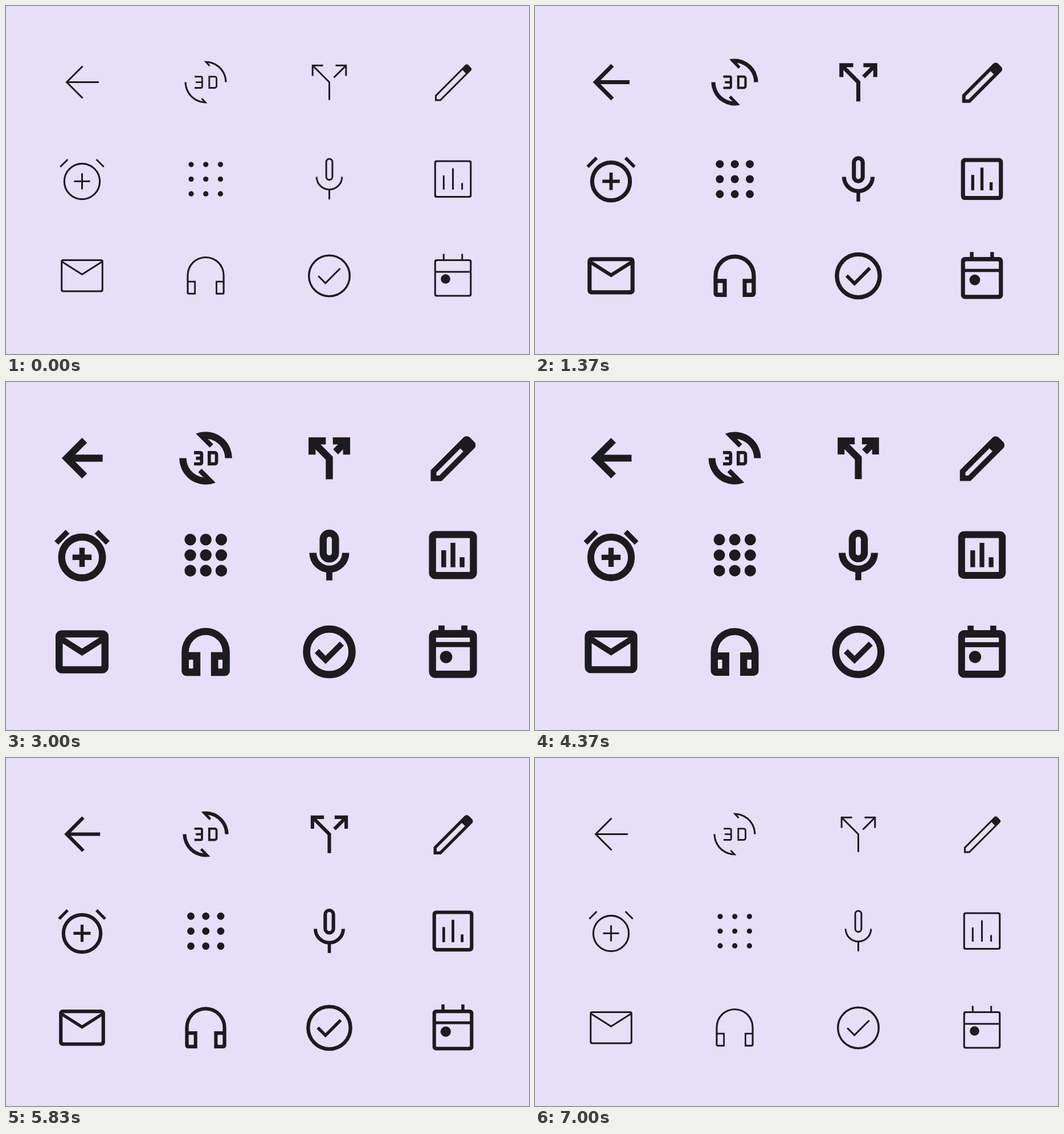
An HTML page with a canvas that plays this animation: 918x610 px, repeating every 8010 ms.

```html
<!DOCTYPE html>
<html lang="en">
<head>
<meta charset="utf-8">
<title>Icon weights</title>
<style>
  html, body { margin: 0; width: 100%; height: 100%; overflow: hidden; background: #e7def7; }
  canvas { display: block; }
</style>
</head>
<body>
<canvas id="stage" width="918" height="610"></canvas>
<script>
const ctx = document.getElementById('stage').getContext('2d');
const LOOP = 8010, RAMP = 3000, HOLD_END = 4000;
const COLUMNS = [133.5, 350.5, 567.5, 784.5];
const ROWS = [133.5, 303.5, 473];
const INK = '#1c1b1f', PAPER = '#e7def7';

let weight = 0; // 0 = thin, 1 = bold
const mix = (thin, bold) => thin + (bold - thin) * weight;

// Drawing helpers, all relative to the centre of an icon
function line(width, ...points) {
  ctx.lineWidth = width;
  ctx.beginPath();
  points.forEach(([x, y]) => ctx.lineTo(x, y));
  ctx.stroke();
}

function dot(x, y, r) {
  ctx.beginPath();
  ctx.arc(x, y, r, 0, 2 * Math.PI);
  ctx.fill();
}

function ring(x, y, outer, inner) {
  ctx.lineWidth = outer - inner;
  ctx.beginPath();
  ctx.arc(x, y, (outer + inner) / 2, 0, 2 * Math.PI);
  ctx.stroke();
}

// Rounded frame, centred horizontally
function frame(outerX, top, bottom, innerX, innerTop, innerBottom) {
  ctx.beginPath();
  ctx.roundRect(-outerX, top, 2 * outerX, bottom - top, mix(4, 10.5));
  ctx.roundRect(-innerX, innerTop, 2 * innerX, innerBottom - innerTop, mix(2, 1));
  ctx.fill('evenodd');
}

function mirrored(draw) {
  draw();
  ctx.save();
  ctx.scale(-1, 1);
  draw();
  ctx.restore();
}

function arrowBack() {
  const w = mix(3, 12.4), x = mix(1, 4.4), y = mix(28, 31.4);
  line(w, [x, -y], [-27, 0], [x, y]);
  line(w, [-27, 0], [mix(29.5, 36.2), 0]);
}

function rotateHalf() {
  const outer = mix(37, 46.3), inner = 33.9;
  ctx.beginPath();
  ctx.arc(0, 0, outer, Math.atan2(mix(-36.7, -42.9), mix(-3, -17.3)), 0);
  ctx.arc(0, 0, inner, 0, Math.atan2(-33.7, 4), true);
  ctx.lineTo(mix(8, 13.2), mix(-29.5, -24.4));
  ctx.lineTo(mix(6, 7.2), mix(-27.5, -18.4));
  ctx.fill();
}

function rotate3d() {
  rotateHalf();
  ctx.save();
  ctx.rotate(Math.PI);
  rotateHalf();
  ctx.restore();

  const left = mix(-19.5, -20.5), right = mix(-6.2, -7.2), top = -9.7, bottom = 10;
  ctx.lineWidth = mix(2.8, 5.7);
  ctx.beginPath();
  ctx.moveTo(left, top);
  ctx.arcTo(right, top, right, 0, 2);
  ctx.arcTo(right, bottom, left, bottom, 2);
  ctx.lineTo(left, bottom);
  ctx.moveTo(mix(-17.5, -17), .2);
  ctx.lineTo(right, .2);
  ctx.moveTo(6.3, top);
  ctx.arcTo(19, top, 19, 0, 3);
  ctx.arcTo(19, bottom, 6.3, bottom, 3);
  ctx.lineTo(6.3, bottom);
  ctx.closePath();
  ctx.stroke();
}

function callSplit() {
  const w = mix(3, 12.4), c = mix(29.3, 30.3), end = mix(11, 6.2), gap = mix(8, 11);
  mirrored(() => line(w, [-end, -c], [-c, -c], [-c, -end]));
  line(w, [-c, -c], [0, 0], [0, mix(31.3, 37)]);
  line(w, [c, -c], [gap, -gap]);
}

// Diagonal bar: s1 and s2 are x + y of its long sides, d is x - y of its far end
function pencilPath(left, bottom, s1, s2, d, radius) {
  ctx.moveTo(left, bottom);
  ctx.lineTo(left, s1 - left);
  ctx.arcTo((s1 + d) / 2, (s1 - d) / 2, (s2 + d) / 2, (s2 - d) / 2, radius);
  ctx.arcTo((s2 + d) / 2, (s2 - d) / 2, s2 - bottom, bottom, radius);
  ctx.lineTo(s2 - bottom, bottom);
  ctx.closePath();
}

function pencil() {
  ctx.beginPath();
  pencilPath(mix(-31.5, -39), mix(33, 40.3), mix(-8.5, -17.7), mix(11.5, 20.3), mix(57, 66), mix(4, 8));
  pencilPath(mix(-28.5, -29), mix(30, 30.5), mix(-4.3, -4), mix(7.3, 6.5), mix(38, 30), 0);
  ctx.fill('evenodd');
}

function alarmAdd() {
  ctx.translate(0, 4);
  const w = mix(3, 9.5), arm = mix(14.1, 16.8);
  ring(0, 0, mix(32.7, 42), 29.6);
  line(w, [-arm, -.2], [arm, -.2]);
  line(w, [0, -arm - .2], [0, arm - .2]);
  mirrored(() => line(w, [mix(-38.2, -45), -25.5], [mix(-25.2, -25.5), mix(-38.5, -45.2)]));
}

function apps() {
  const step = mix(25.7, 27.2);
  for (let i = -1; i <= 1; i++)
    for (let j = -1; j <= 1; j++) dot(.2 + i * step, j * step, mix(4.6, 10.2));
}

function mic() {
  const half = mix(5.4, 10.8), top = mix(-35.5, -38.5), bottom = mix(1.2, 6.7);
  ctx.lineWidth = mix(3, 12.5);
  ctx.beginPath();
  ctx.roundRect(-half, top, 2 * half, bottom - top, half);
  ctx.stroke();
  ctx.beginPath();
  ctx.arc(0, -4.1, mix(22.3, 28.7), 0, Math.PI);
  ctx.stroke();
  line(mix(3, 10.8), [0, 19], [0, mix(35.4, 44.3)]);
}

function chart() {
  const outer = mix(32.8, 42.1), inner = 29.7, w = mix(3, 8.5), base = mix(18.4, 21.2);
  frame(outer, -outer - .2, outer - .2, inner, -inner - .2, inner - .2);
  line(w, [-16.2, mix(-6.5, -8.6)], [-16.2, base]);
  line(w, [0, mix(-19, -21.6)], [0, base]);
  line(w, [16.1, mix(6.8, 3.6)], [16.1, base]);
}

function mail() {
  const apex = mix(-2.5, .5), edge = apex - 22.5;
  frame(mix(37.3, 46.5), mix(-29, -37.8), mix(28.5, 37.7), mix(34.3, 34), mix(-26, -25.3), mix(25.5, 25.2));
  line(mix(2.9, 10.8), [-35.5, edge], [0, apex], [35.5, edge]);
}

function headphones() {
  const outer = mix(33.1, 42.3), inner = mix(30, 29.7), y = mix(-1, .3);
  const bottom = mix(32.8, 42.3), cup = mix(17.5, 9.3), cupTop = mix(8.8, .6), r = mix(3.5, 9);
  const holeTop = mix(11.6, 13.8), holeHeight = mix(18.2, 15.5);
  const holeOut = mix(30, 29.5), holeIn = mix(20.3, 22);
  ctx.beginPath();
  ctx.moveTo(-cup, bottom);
  ctx.arcTo(-outer, bottom, -outer, y, r);
  ctx.arc(0, y, outer, Math.PI, 0);
  ctx.arcTo(outer, bottom, cup, bottom, r);
  ctx.lineTo(cup, bottom);
  ctx.lineTo(cup, cupTop);
  ctx.lineTo(inner, cupTop);
  ctx.arc(0, y, inner, 0, Math.PI, true);
  ctx.lineTo(-inner, cupTop);
  ctx.lineTo(-cup, cupTop);
  ctx.closePath();
  ctx.roundRect(-holeOut, holeTop, holeOut - holeIn, holeHeight, 1);
  ctx.roundRect(holeIn, holeTop, holeOut - holeIn, holeHeight, 1);
  ctx.fill('evenodd');
}

function checkCircle() {
  ring(0, 0, mix(37.5, 46.2), mix(34.1, 33.6));
  line(mix(3, 10.2), [mix(-19.3, -22), mix(.3, -1.3)], [mix(-6.8, -6.6), mix(12.8, 14.1)],
    [mix(19, 22), mix(-13, -14.5)]);
}

function calendar() {
  const top = mix(-29, -38.3), ruleTop = mix(-8.5, -17.2), ruleBottom = mix(-5.5, -8.3);
  const hanger = mix(16.2, 20);
  frame(mix(32.8, 42.1), top, mix(36.5, 45.8), 29.7, mix(-26, -25), mix(33.5, 33));
  ctx.fillRect(-31, ruleTop, 62, ruleBottom - ruleTop);
  mirrored(() => line(mix(3, 10.8), [hanger, mix(-38.5, -46.2)], [hanger, top + 2]));
  dot(mix(-13, -12), mix(5.5, 9), mix(8.3, 10.8));
}

const ICONS = [
  arrowBack, rotate3d, callSplit, pencil,
  alarmAdd, apps, mic, chart,
  mail, headphones, checkCircle, calendar
];

const ease = p => (1 - Math.cos(Math.PI * Math.min(1, Math.max(0, p)))) / 2;

function draw(now) {
  const t = now % LOOP;
  weight = ease(t / RAMP) - ease((t - HOLD_END) / RAMP);
  ctx.fillStyle = PAPER;
  ctx.fillRect(0, 0, 918, 610);
  ctx.fillStyle = ctx.strokeStyle = INK;
  ICONS.forEach((icon, i) => {
    ctx.save();
    ctx.translate(COLUMNS[i % 4], ROWS[Math.floor(i / 4)]);
    icon();
    ctx.restore();
  });
}

const start = performance.now();
function tick() {
  draw(performance.now() - start);
  requestAnimationFrame(tick);
}
tick();
</script>
</body>
</html>
```
